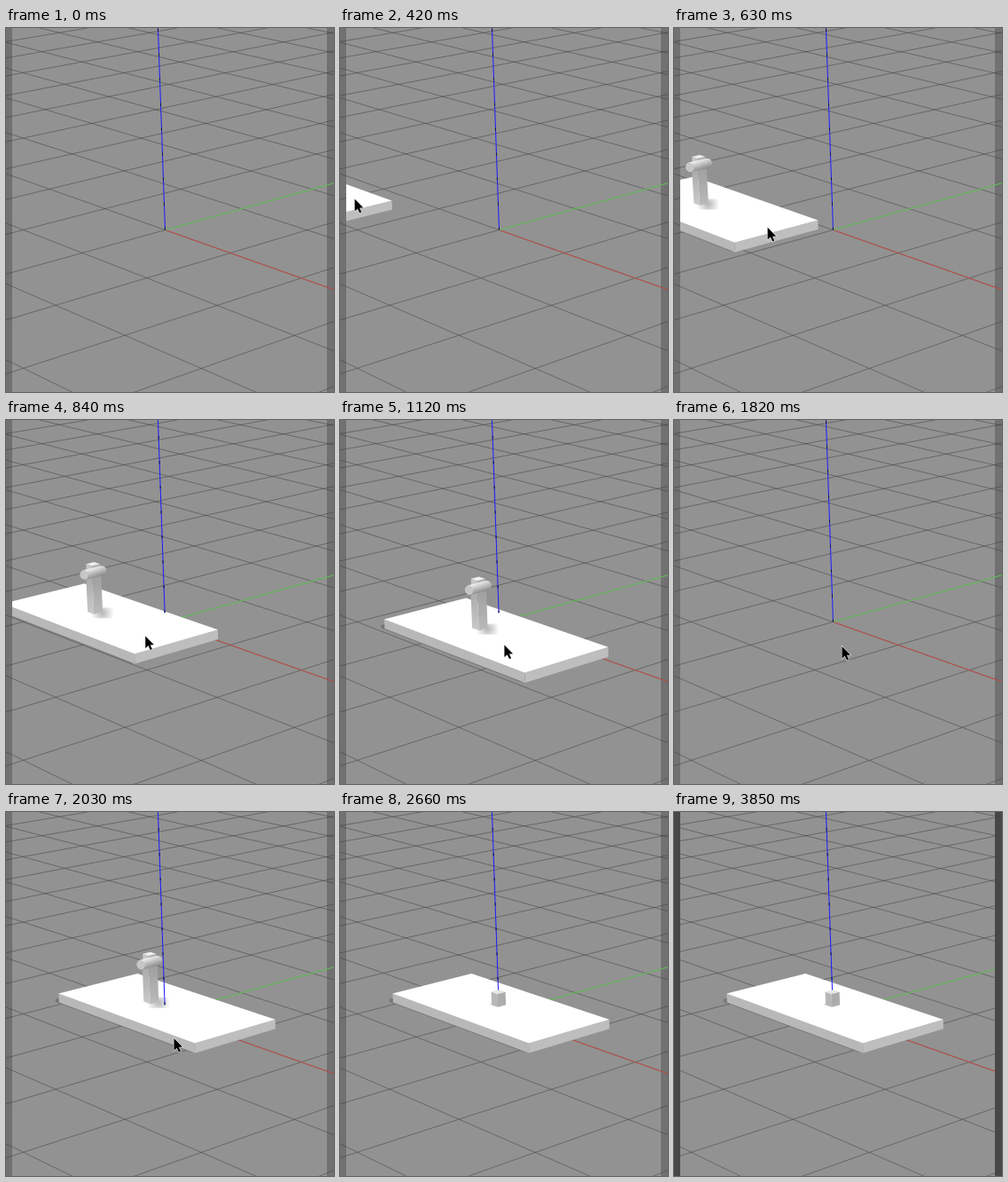
These frames come from a looping animation (370 by 410 pixels, 3990 ms). An HTML page with a canvas:

```html
<!DOCTYPE html>
<html>
<head>
<meta charset="utf-8">
<style>
html, body { margin: 0; width: 100%; height: 100%; overflow: hidden; background: #919191; }
canvas { display: block; }
</style>
</head>
<body>
<canvas id="stage" width="370" height="410"></canvas>
<script>
const ctx = document.getElementById('stage').getContext('2d');
const W = 370, H = 410, LOOP = 3990, STEP = 70;
const BAR = 7, RIGHT_BAR = 362;
const SLAB = { hx: 1.09, hy: 0.5, height: 0.095 };

// Perspective projection of world coordinates to pixel centres
function project(x, y, z = 0) {
  const w = 1 - 0.0406 * x + 0.0404 * y - 0.0159 * z;
  return [(179 + 63.3 * x + 96.8 * y - 6.65 * z) / w + 0.5,
          (227 + 15.7 * x - 15.63 * y - 111.6 * z) / w + 0.5];
}

function trace(points, close) {
  ctx.beginPath();
  points.forEach(p => ctx.lineTo(...p));
  if (close) ctx.closePath();
}

function fill(points, color) {
  trace(points, true);
  ctx.fillStyle = color;
  ctx.fill();
}

function line(a, b, color, width = 1, dash = []) {
  trace([a, b]);
  ctx.strokeStyle = color;
  ctx.lineWidth = width;
  ctx.setLineDash(dash);
  ctx.stroke();
  ctx.setLineDash([]);
}

function shade(a, b, from, to) {
  const g = ctx.createLinearGradient(...a, ...b);
  g.addColorStop(0, from);
  g.addColorStop(1, to);
  return g;
}

function box(cx, cy, hx, hy, z0, z1, top, left, right) {
  const corner = (sx, sy, z) => project(cx + sx * hx, cy + sy * hy, z);
  const wall = (ax, ay, bx, by) =>
    [corner(ax, ay, z0), corner(bx, by, z0), corner(bx, by, z1), corner(ax, ay, z1)];
  fill(wall(-1, -1, 1, -1), left);
  fill(wall(1, -1, 1, 1), right);
  fill([corner(-1, -1, z1), corner(1, -1, z1), corner(1, 1, z1), corner(-1, 1, z1)], top);
}

function drawBars(color) {
  ctx.fillStyle = color;
  ctx.fillRect(0, 0, BAR, H);
  ctx.fillRect(RIGHT_BAR, 0, W - RIGHT_BAR, H);
}

function drawGround() {
  ctx.fillStyle = '#929292';
  ctx.fillRect(0, 0, W, H);
  drawBars('#717171');
  for (let i = -10; i <= 10; i++) {
    line(project(i, -10), project(i, 10), 'rgba(60,60,60,.5)');
    line(project(-10, i), project(10, i), 'rgba(60,60,60,.5)');
  }
  line(project(0, 0), project(4, 0), '#c44c48');
  line(project(0, 0), project(0, 4), '#66cc5c');
}

function drawBlueAxis(base) {
  const a = project(0, 0, base), b = project(0, 0, 2.2);
  line(a, b, '#1a1aff');
  line(a, b, '#101030', 1, [3, 25]);
}

function drawSlab(x, y) {
  const { hx, hy, height } = SLAB;
  box(x - 0.04, y, hx, hy + 0.015, 0, 0.03, '#757575', '#757575', '#757575');
  box(x, y, hx, hy, 0, height, '#ffffff', '#b8b8b8', '#bebebe');
}

function drawPost(slabX, y) {
  const x = slabX - 0.21, neck = 0.52, z0 = SLAB.height;
  const foot = project(x, y, z0), top = project(x, y, neck);

  const [sx, sy] = project(x + 0.08, y + 0.03, z0);
  const shadow = ctx.createRadialGradient(sx, sy, 1, sx, sy, 13);
  shadow.addColorStop(0, 'rgba(120,120,120,.5)');
  shadow.addColorStop(1, 'rgba(120,120,120,0)');
  ctx.fillStyle = shadow;
  ctx.fillRect(sx - 13, sy - 6, 26, 12);

  box(x, y, 0.053, 0.053, z0, neck, '#cccccc',
    shade(top, foot, '#a4a4a4', '#c8c8c8'), shade(top, foot, '#9c9c9c', '#b8b8b8'));
  box(x, y, 0.048, 0.048, neck, 0.59, '#f0f0f0', '#c6c6c6', '#b2b2b2');

  const near = project(x, y - 0.1, 0.5), far = project(x, y + 0.1, 0.5);
  const mid = project(x, y, 0.5);
  ctx.lineCap = 'round';
  line(near, far, shade([mid[0] - 2, mid[1] - 6], [mid[0] + 2, mid[1] + 6], '#f4f4f4', '#888888'), 11);
  ctx.lineCap = 'butt';
  ctx.beginPath();
  ctx.ellipse(near[0] - 1, near[1] + 0.3, 4.5, 5.3, -0.3, 0, Math.PI * 2);
  ctx.fillStyle = '#c6c6c6';
  ctx.fill();
}

function drawCube() {
  const z = SLAB.height;
  box(-0.035, -0.02, 0.045, 0.03, z, z, '#bdbdbd', '#bdbdbd', '#bdbdbd');
  box(0, 0, 0.05, 0.05, z, 0.23, '#e6e6e6', '#b7b7b7', '#adadad');
}

function drawCursor(x, y) {
  const shape = [[0, 0], [0, 13.5], [3.2, 10.7], [5.5, 15.5], [7.6, 14.6], [5.4, 10], [9.5, 9.6]];
  trace(shape.map(p => [p[0] + x, p[1] + y]), true);
  ctx.lineWidth = 1.2;
  ctx.strokeStyle = '#e8e8e8';
  ctx.stroke();
  ctx.fillStyle = '#000';
  ctx.fill();
}

// Share of the drag still to go: 1 at its start, 0 at its end
const remaining = t => Math.min(1, Math.max(0, (1400 - t) / 1120));

function slabPosition(t) {
  const r = remaining(t);
  return [0.715 - 4.08 * r ** 2, -0.425 - 0.74 * r ** 4];
}

function cursorPosition(t) {
  const r = remaining(t);
  const leave = Math.max(0, (t - 2310) / 280);
  return [189.5 - 258 * r ** 3 - 16 * leave + 12 * Math.sin(Math.PI * leave),
          255 - 93 * r ** 3 - 196 * leave ** 1.5];
}

function drawScene(t) {
  const dragged = t >= 280 && t < 1820;
  const placed = t >= 2030;
  if (!dragged && !placed) return drawBlueAxis(0);

  const [x, y] = placed ? [0.03, -0.03] : slabPosition(t);
  const coversOrigin = Math.abs(x) < SLAB.hx && Math.abs(y) < SLAB.hy;
  const drawAxis = () => drawBlueAxis(coversOrigin ? SLAB.height : 0);
  drawSlab(x, y);
  if (t >= 2100) {
    drawAxis();
    drawCube();
  } else if (x < 0.5) {
    drawPost(x, y);
    drawAxis();
  } else {
    drawAxis();
    drawPost(x, y);
  }
}

function draw(t) {
  drawGround();
  ctx.save();
  ctx.beginPath();
  ctx.rect(BAR, 0, RIGHT_BAR - BAR, H);
  ctx.clip();
  drawScene(t);
  if (t >= 280 && t < 2660) drawCursor(...cursorPosition(t));
  ctx.restore();
  if (t >= 3850) drawBars('rgba(68,68,68,.93)');
}

function tick() {
  const t = performance.now() % LOOP;
  draw(Math.floor(t / STEP) * STEP);
  requestAnimationFrame(tick);
}
tick();
</script>
</body>
</html>
```
